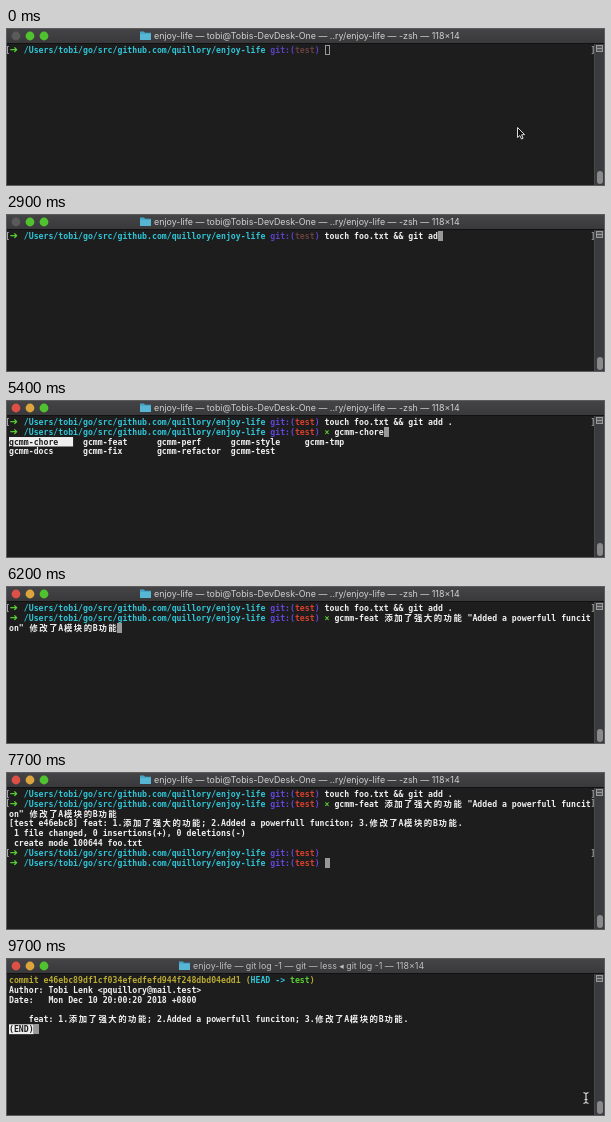
Animation, 599 px wide and 158 px high, one loop 9.8 s. Source, as an HTML page with a canvas:

```html
<!DOCTYPE html>
<html lang="en">
<head>
<meta charset="utf-8">
<title>Terminal</title>
<style>
html, body { margin: 0; width: 100%; height: 100%; overflow: hidden; background: #1d1d1d; }
canvas { display: block; width: 599px; height: 158px; }
</style>
</head>
<body>
<canvas id="stage" width="599" height="158"></canvas>
<script>
const ctx = document.getElementById('stage').getContext('2d');
const LOOP = 9800, STEP = 100;
const COLS = 118, CELL = 4.93, LEFT = 3, TOP = 17, PITCH = 9.86;
const MONO = 'bold 8.2px "DejaVu Sans Mono", monospace';
const WIDE = 'bold 8.4px "Noto Sans CJK SC", "Noto Sans CJK", sans-serif';
const COLOR = {
  back: '#1d1d1d', text: '#f0f0f0', green: '#58d032', cyan: '#30c4d6',
  blue: '#6446dc', red: '#d8402e', yellow: '#b9aa32',
  cursor: '#989898', mark: '#a0a0a0'
};
const HOME = '/Users/tobi/go/src/github.com/quillory/enjoy-life';
const SHELL_TITLE = 'enjoy-life — tobi@Tobis-DevDesk-One — ..ry/enjoy-life — -zsh — 118×14';
const PAGER_TITLE = 'enjoy-life — git log -1 — git — less ◂ git log -1 — 118×14';
const ADD = 'touch foo.txt && git add .';
const CN_ONE = '添加了强大的功能', CN_TWO = '修改了A模块的B功能';
const COMMIT = `gcmm-feat ${CN_ONE} "Added a powerfull funciton" ${CN_TWO}`;
const SUMMARY = `feat: 1.${CN_ONE}; 2.Added a powerfull funciton; 3.${CN_TWO}.`;
const KINDS = ['chore', 'docs', 'feat', 'fix', 'perf', 'refactor', 'style', 'test', 'tmp'];

// Moments at which something happens, in ms
const AT = {
  focus: 300, typeAdd: 600, ran: 3600, typeCommit: 4000, list: 4900,
  pick: 5200, pickNext: 5500, pickFeat: 5700, accept: 5900, args: 6200,
  done: 6700, blank: 7300, typeLog: 7700, pager: 9000, pointer: 9400
};

const typed = (text, t, start) => text.slice(0, Math.max(0, Math.floor((t - start) / 100)));
const isWide = ch => ch >= '\u3000' && ch <= '\u9fff';
const colX = col => LEFT + col * CELL;
const rowY = row => TOP + row * PITCH;

function box(x, y, w, h, color) {
  ctx.fillStyle = color;
  ctx.fillRect(x, y, w, h);
}

function outline(x, y, w, h, color) {
  ctx.strokeStyle = color;
  ctx.lineWidth = 1;
  ctx.strokeRect(x + 0.5, y + 0.5, w - 1, h - 1);
}

function shape(points, fill, stroke) {
  ctx.beginPath();
  points.forEach(([x, y]) => ctx.lineTo(x, y));
  ctx.closePath();
  ctx.fillStyle = fill;
  ctx.fill();
  if (stroke) {
    ctx.strokeStyle = stroke;
    ctx.lineWidth = 1;
    ctx.stroke();
  }
}

// Prints on the character grid, wraps at the last column, returns the next place
function print(text, pos, color = COLOR.text) {
  let { col, row } = pos;
  ctx.fillStyle = color;
  for (const ch of text) {
    const span = isWide(ch) ? 2 : 1;
    if (col + span > COLS) { col = 0; row++; }
    ctx.font = span === 2 ? WIDE : MONO;
    ctx.fillText(ch, colX(col) + (span - 1) * 0.7, rowY(row) + 7.9);
    col += span;
  }
  return { col, row };
}

const line = (text, row, color) => print(text, { col: 0, row }, color);

function runs(parts, row) {
  return parts.reduce((pos, [text, color]) => print(text, pos, color), { col: 0, row });
}

function marks(row) {
  ctx.font = MONO;
  ctx.fillStyle = COLOR.mark;
  ctx.fillText('[', -0.8, rowY(row) + 7.6);
  ctx.fillText(']', 584.5, rowY(row) + 7.6);
}

function prompt(row, dim, dirty) {
  ctx.font = 'bold 10px "DejaVu Sans", sans-serif';
  ctx.fillStyle = COLOR.green;
  ctx.fillText('➜', 3.6, rowY(row) + 8.3);
  const blue = dim ? '#5b42c0' : COLOR.blue;
  const parts = [
    ['   ', COLOR.text], [HOME + ' ', COLOR.cyan], ['git:(', blue],
    ['test', dim ? '#68403f' : COLOR.red], [') ', blue]
  ];
  if (dirty) parts.push(['× ', COLOR.green]);
  return runs(parts, row);
}

function cursor({ col, row }, hollow) {
  const x = Math.round(colX(col)), y = Math.round(rowY(row));
  (hollow ? outline : box)(x, y, 5, 10, COLOR.cursor);
}

function completions(selected) {
  KINDS.forEach((kind, i) => {
    const pos = { col: Math.floor(i / 2) * 15, row: 2 + i % 2 };
    const on = i === selected;
    if (on) box(colX(pos.col), rowY(pos.row) + 0.3, 13 * CELL, PITCH - 0.4, COLOR.text);
    print('gcmm-' + kind, pos, on ? COLOR.back : COLOR.text);
  });
}

function commitInput(t) {
  if (t >= AT.args) return COMMIT;
  if (t >= AT.pickFeat) return 'gcmm-feat' + (t >= AT.accept ? ' ' : '');
  if (t >= AT.pickNext) return 'gcmm-docs';
  if (t >= AT.pick) return 'gcmm-chore';
  return typed('gcmm-', t, AT.typeCommit);
}

function shell(t) {
  marks(0);
  let end = print(typed(ADD, t, AT.typeAdd), prompt(0, t < AT.ran, false));
  if (t >= AT.ran) {
    end = print(commitInput(t), prompt(1, false, true));
    if (t >= AT.list && t < AT.accept) {
      const selected = t < AT.pick ? -1 : t < AT.pickNext ? 0 : t < AT.pickFeat ? 1 : 2;
      completions(selected);
    }
  }
  if (t >= AT.done) {
    marks(1);
    line('[test e46ebc8] ' + SUMMARY, 3);
    line(' 1 file changed, 0 insertions(+), 0 deletions(-)', 4);
    line(' create mode 100644 foo.txt', 5);
    end = prompt(6, false, false);
  }
  if (t >= AT.blank) {
    marks(6);
    end = print(typed('git log -1', t, AT.typeLog), prompt(7, false, false));
  }
  cursor(end, t < AT.focus);
}

function pager() {
  runs([
    ['commit e46ebc89df1cf034efedfefd944f248dbd04edd1 (', COLOR.yellow],
    ['HEAD -> ', COLOR.cyan], ['test', COLOR.green], [')', COLOR.yellow]
  ], 0);
  line('Author: Tobi Lenk <pquillory@mail.test>', 1);
  line('Date:   Mon Dec 10 20:00:20 2018 +0800', 2);
  line('    ' + SUMMARY, 4);
  box(LEFT, rowY(5), 5 * CELL, PITCH, COLOR.text);
  cursor(line('(END)', 5, COLOR.back));
}

function titleBar(t) {
  const bar = ctx.createLinearGradient(0, 0, 0, 15);
  bar.addColorStop(0, '#454547');
  bar.addColorStop(1, '#39393b');
  ctx.fillStyle = bar;
  ctx.fillRect(0, 0, 599, 15);
  box(0, 15, 599, 1, '#111111');

  const green = '#50c230';
  const close = t < AT.ran ? '#5a5a5a' : '#dc5046';
  const minimize = t < AT.list ? green : '#dba43c';
  [close, minimize, green].forEach((color, i) => {
    ctx.beginPath();
    ctx.arc(10 + 14 * i, 8, 4.4, 0, Math.PI * 2);
    ctx.fillStyle = color;
    ctx.fill();
  });

  const inPager = t >= AT.pager;
  const x = inPager ? 173 : 134;
  shape([[x, 3.5], [x + 4, 3.5], [x + 5, 4.7], [x + 11, 4.7], [x + 11, 12], [x, 12]], '#46a6c8');
  box(x, 6, 11, 6, '#56b6d4');
  ctx.font = '8.9px Inter, "DejaVu Sans", sans-serif';
  ctx.fillStyle = inPager ? '#bdbdbd' : '#d0d0d0';
  ctx.fillText(inPager ? PAGER_TITLE : SHELL_TITLE, x + 14, 11);
}

function scrollBar() {
  box(588, 16, 11, 142, '#393b3f');
  box(588, 16, 1, 142, '#47494d');
  box(590, 17, 7, 7, '#55575b');
  outline(590, 17, 7, 7, '#9a9a9a');
  box(591, 20, 5, 1, '#9a9a9a');
  ctx.fillStyle = '#8a8a8c';
  ctx.beginPath();
  ctx.roundRect(591, 143, 6, 13, 3);
  ctx.fill();
}

function arrowPointer(x, y) {
  const points = [[0, 0], [0, 10], [2.3, 8], [4, 11.5], [5.6, 10.8], [4.1, 7.3], [7.2, 7.1]];
  shape(points.map(([dx, dy]) => [x + dx, y + dy]), '#111111', '#dddddd');
}

function beamPointer(x, y) {
  ctx.strokeStyle = '#d8d8d8';
  ctx.lineWidth = 1.2;
  ctx.beginPath();
  for (const end of [-1, 1]) {
    ctx.moveTo(x - 2.5, y + 5.5 * end);
    ctx.lineTo(x, y + 4.5 * end);
    ctx.lineTo(x + 2.5, y + 5.5 * end);
  }
  ctx.moveTo(x, y - 4.5);
  ctx.lineTo(x, y + 4.5);
  ctx.moveTo(x - 1.5, y + 1.5);
  ctx.lineTo(x + 1.5, y + 1.5);
  ctx.stroke();
}

function draw(t) {
  box(0, 0, 599, 158, COLOR.back);
  titleBar(t);
  scrollBar();
  outline(0, 0, 599, 158, '#5c5c5e');
  if (t >= AT.pager) pager();
  else shell(t);
  if (t < AT.typeAdd) arrowPointer(511.5, 99.5);
  if (t >= AT.pointer) beamPointer(580, 140);
}

function tick() {
  const t = performance.now() % LOOP;
  draw(Math.floor(t / STEP) * STEP);
  requestAnimationFrame(tick);
}
tick();
</script>
</body>
</html>
```
